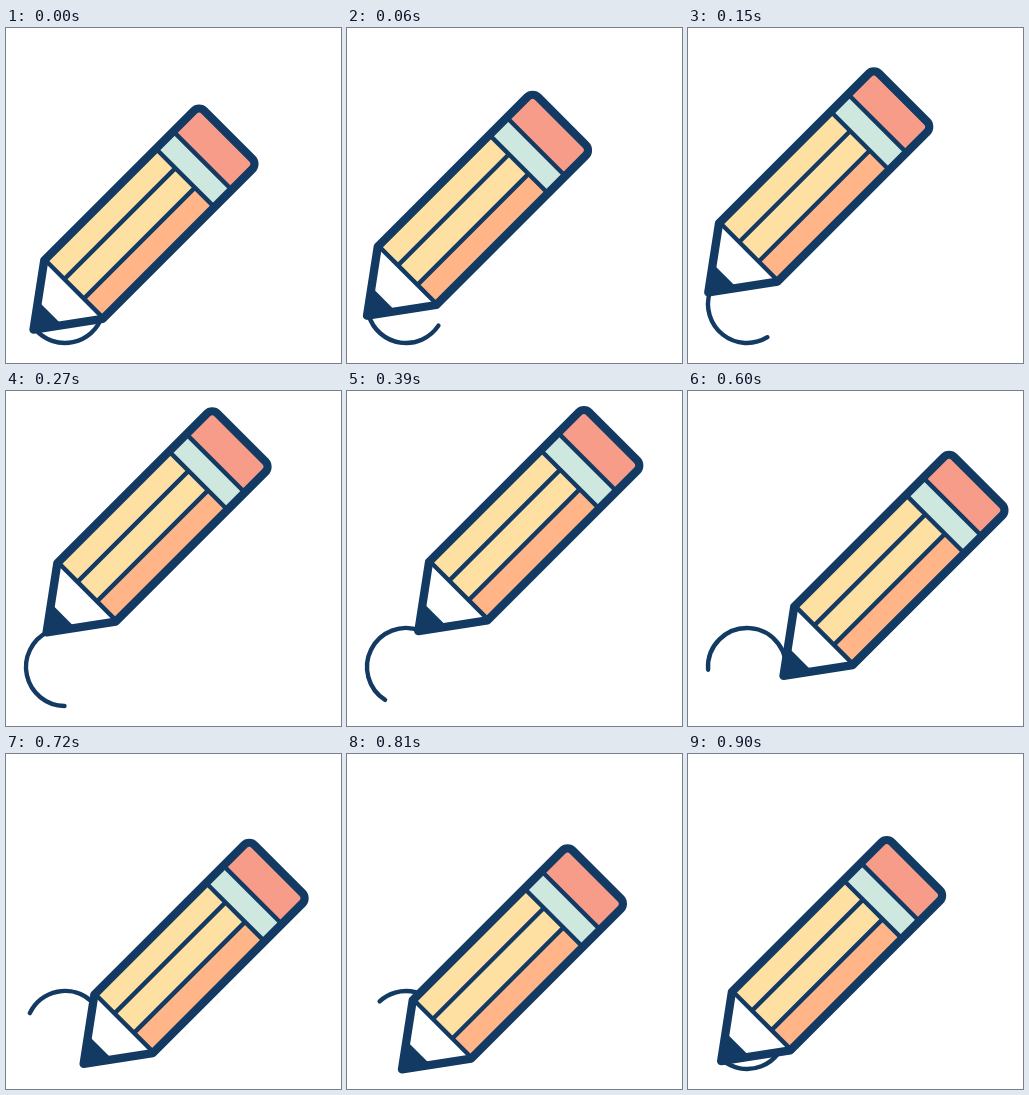
Recreate the animation shown at these times as an HTML page. Size 335x335 px, loop 930 ms.

```html
<!DOCTYPE html>
<html lang="en">
<head>
<meta charset="utf-8">
<title>Pencil drawing a circle</title>
<style>
  html, body { margin: 0; width: 100%; height: 100%; overflow: hidden; background: #fff; }
  svg { display: block; width: 100vw; height: 100vh; }
  .ink { fill: none; stroke: #123a63; stroke-width: 4.4; }
  .outline { stroke-width: 8.3; stroke-linejoin: round; }
  #trail { stroke-linecap: round; }
</style>
</head>
<body>
<svg viewBox="0 0 335 335">
  <path id="trail" class="ink"/>
  <!-- Local x runs from the tip towards the eraser -->
  <g id="pencil">
    <path fill="#f69c89" d="M230-41.3H266.5a7.5 7.5 0 0 1 7.5 7.5V33.8a7.5 7.5 0 0 1-7.5 7.5H230z"/>
    <path fill="#cfe8df" d="M213-41.3h24.5v82.6H213z"/>
    <path fill="#ffe0a3" d="M56-41.3h157v55.1H56z"/>
    <path fill="#ffb587" d="M56 13.8h157v27.5H56z"/>
    <path fill="#fff" d="M-1.5 0L55-41.3h1v82.6h-1z"/>
    <path fill="#123a63" d="M-1.5 0L22-16v32z"/>
    <path class="ink" d="M56-41.3v82.6M213-41.3v82.6M237.5-41.3v82.6M56-13.8h157M56 13.8h157"/>
    <path class="ink outline" d="M-1.5 0L55-41.3H266.5a7.5 7.5 0 0 1 7.5 7.5V33.8a7.5 7.5 0 0 1-7.5 7.5H55z"/>
  </g>
</svg>
<script>
  const LOOP = 930, STEP = 30;
  const CX = 59, CY = 276, R = 39;
  const trail = document.getElementById('trail');
  const pencil = document.getElementById('pencil');

  function onCircle(degrees) {
    const a = degrees * Math.PI / 180;
    return [CX + R * Math.cos(a), CY + R * Math.sin(a)];
  }

  function draw(now) {
    const t = Math.floor(now % LOOP / STEP) * STEP;
    const head = 140 + 360 * t / LOOP;
    // The tail lags behind the tip and slows a little
    const tail = 17 + 0.28 * t - 0.000025 * t * t;
    const tip = onCircle(head);
    const large = head - tail > 180 ? 1 : 0;
    trail.setAttribute('d', `M${onCircle(tail)}A${R} ${R} 0 ${large} 1 ${tip}`);
    pencil.setAttribute('transform', `translate(${tip}) rotate(-45) translate(0 -0.8)`);
    requestAnimationFrame(() => draw(performance.now()));
  }
  draw(performance.now());
</script>
</body>
</html>
```
